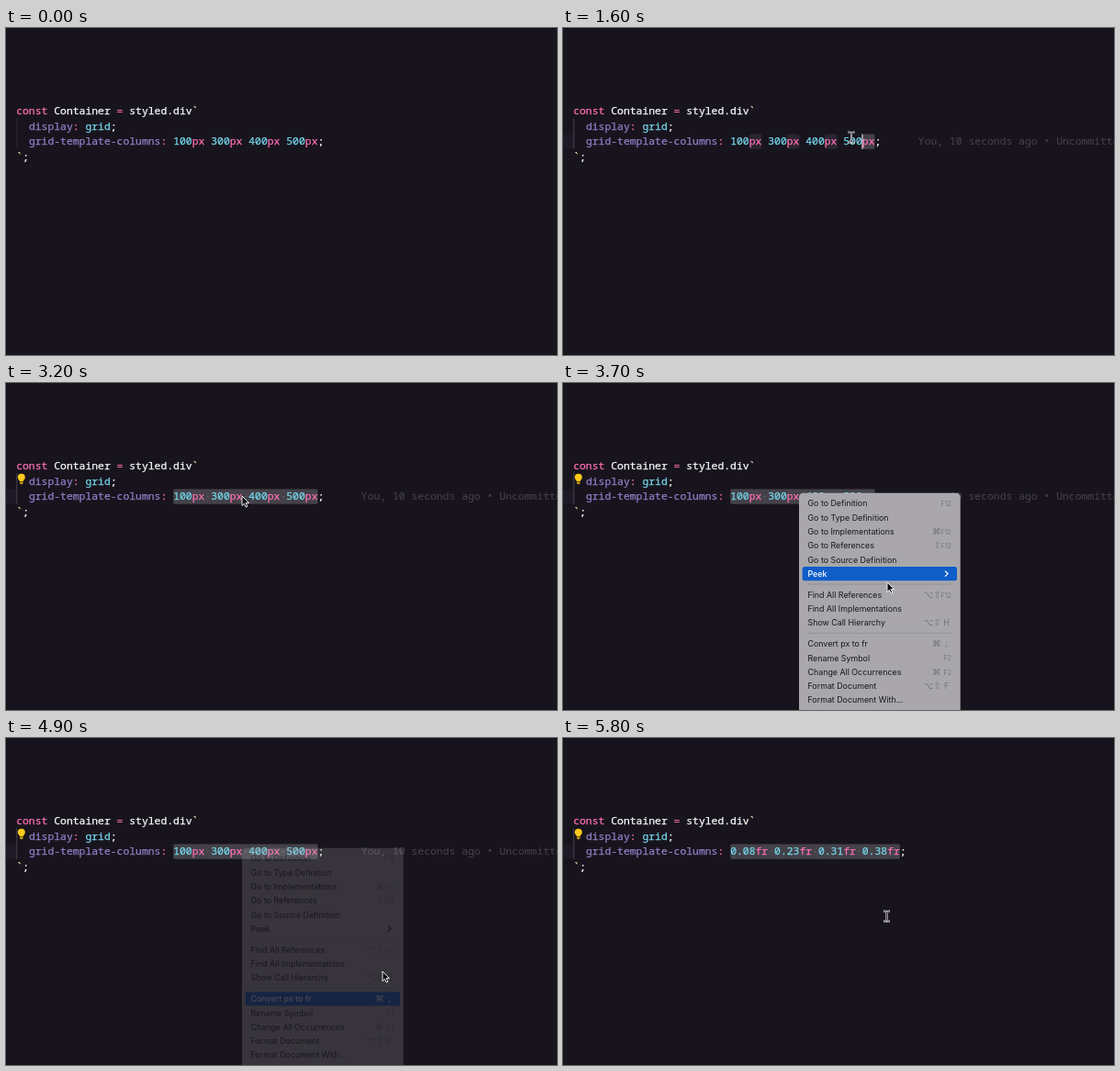
Write an HTML page that moves like this. It is 600 px wide and 356 px high and loops after 5.9 s.

```html
<!DOCTYPE html>
<html lang="en">
<head>
<meta charset="utf-8">
<title>Convert px to fr</title>
<style>
  html, body { margin: 0; width: 100%; height: 100%; overflow: hidden; background: #18141d; }
  svg { display: block; width: 600px; height: 356px; }
  text { white-space: pre; }
  .code { font: 11.4px "Noto Sans Mono", "DejaVu Sans Mono", monospace; color: #fbfafc; }
  .code, .code tspan { fill: currentColor; stroke: currentColor; stroke-width: .25; }
  .code .pink { color: #ff70b5; }
  .code .cyan { color: #75d7ec; }
  .code .purple { color: #8f80c8; }
  .code .yellow { color: #ece5b0; }
  .blame { color: #45414a; stroke-width: .1; }
  .menu { font: 8.85px Inter, Roboto, sans-serif; }
  .item { fill: #18171b; }
  .keys { fill: #75737a; }
  .symbol { font: 9.5px "DejaVu Sans", sans-serif; }
  .fn { font-size: 7px; }
  .hover .item, .hover .keys { fill: #fff; }
  .hover .item { font-weight: 500; }
  .hover .bar { visibility: visible; }
  .bar { fill: #0f5dc9; visibility: hidden; }
  .chevron { fill: none; stroke: #242328; stroke-width: 1.3; }
  .hover .chevron { stroke: #fff; }
</style>
</head>
<body>
<svg viewBox="0 0 600 356">
  <rect width="600" height="356" fill="#18141d"/>
  <rect id="lineBand" y="116" width="11" height="15.5" fill="#1d1926"/>
  <path id="guide" d="M11.8 98.5V131.5"/>
  <g id="marks"></g>
  <g id="editor" class="code"></g>
  <text id="blame" class="code blame" y="127.2">You, 10 seconds ago • Uncommitted changes</text>
  <rect id="caret" y="115.5" width="1" height="16.3" fill="#f4f2f7"/>
  <g id="bulb">
    <path d="M14.8 107C14.8 105.8 12.8 105 12.8 102.8A4 4 0 0 1 20.8 102.8C20.8 105 18.8 105.8 18.8 107Z" fill="#ffca1a"/>
    <path d="M15 107.5H18.6V109L17.8 110.2H15.8L15 109Z" fill="#c89b12"/>
  </g>
  <g id="menu" class="menu">
    <rect x="257" y="119.7" width="175.7" height="250" rx="4.5" fill="#a9a7ac"/>
    <path d="M266.5 219H423.5M266.5 272.3H423.5" stroke="#918f95"/>
  </g>
  <path id="arrow" d="M0 0V10.6L2.4 8.3L4.1 12.1L5.9 11.3L4.2 7.6H7.5Z" fill="#0b0a0c" stroke="#fff" stroke-width=".9" stroke-linejoin="round"/>
  <g id="beam" fill="none" stroke-linecap="square">
    <path d="M-2.5 -5.5Q0 -5.5 0 -4V4Q0 5.5 -2.5 5.5M2.5 -5.5Q0 -5.5 0 -4M2.5 5.5Q0 5.5 0 4" stroke="#e9e8eb" stroke-width="2.1"/>
    <path d="M-2.5 -5.5Q0 -5.5 0 -4V4Q0 5.5 -2.5 5.5M2.5 -5.5Q0 -5.5 0 -4M2.5 5.5Q0 5.5 0 4" stroke="#29262d" stroke-width=".8"/>
  </g>
</svg>
<script>
const LOOP = 5900, STEP = 100;
const LEFT = 11.2, CHAR = 6.84, VALUE_COL = 25;
const PX = "100px 300px 400px 500px";
const FR = "0.08fr 0.23fr 0.31fr 0.38fr";
const $ = id => document.getElementById(id);
const colX = col => LEFT + col * CHAR;
const show = (id, on) => $(id).setAttribute("visibility", on ? "visible" : "hidden");
const span = (color, text) => `<tspan class="${color}">${text}</tspan>`;
const codeLine = (row, body, col = 0) =>
  `<text x="${colX(col)}" y="${94 + row * 16.6}">${body}</text>`;

// Menu rows: label, modifier symbols, key, centre y
const ROWS = [
  ["Go to Definition", "", "F12", 131],
  ["Go to Type Definition", "", "", 146.3],
  ["Go to Implementations", "⌘", "F12", 161.6],
  ["Go to References", "⇧", "F12", 177],
  ["Go to Source Definition", "", "", 192.3],
  ["Peek", "", ">", 207.6],
  ["Find All References", "⌥⇧", "F12", 230.5],
  ["Find All Implementations", "", "", 245.8],
  ["Show Call Hierarchy", "⌥⇧", "H", 261.1],
  ["Convert px to fr", "⌘", ";", 284],
  ["Rename Symbol", "", "F2", 299.3],
  ["Change All Occurrences", "⌘", "F2", 314.6],
  ["Format Document", "⌥⇧", "F", 329.9],
  ["Format Document With...", "", "", 345.2]
];

function keyMarkup(key, y) {
  if (key === ">") return `<path class="chevron" d="M416 ${y - 3}L419 ${y}L416 ${y + 3}"/>`;
  return key.length > 1
    ? `<text class="keys fn" x="423" y="${y + 3}" text-anchor="end">${key}</text>`
    : `<text class="keys" x="417.5" y="${y + 3.2}" text-anchor="middle">${key}</text>`;
}

$("menu").innerHTML += ROWS.map(([label, symbols, key, y]) => `<g class="row">
  <rect class="bar" x="260.7" y="${y - 7.6}" width="168.3" height="15.2" rx="2.5"/>
  <text class="item" x="266.5" y="${y + 3.2}">${label}</text>
  <text class="keys symbol" x="411.5" y="${y + 3.3}" text-anchor="end">${symbols}</text>
  ${keyMarkup(key, y)}</g>`).join("");
const rowNodes = [...document.querySelectorAll(".row")];

$("editor").innerHTML =
  codeLine(0, span("pink", "const") + " Container " + span("pink", "=") + " styled.div" + span("yellow", "`")) +
  codeLine(1, span("purple", "display") + span("pink", ":") + " " + span("cyan", "grid") + ";", 2) +
  codeLine(2, span("purple", "grid-template-columns") + span("pink", ":"), 2) +
  codeLine(2, "", VALUE_COL).replace("<text", '<text id="value"') +
  codeLine(3, span("yellow", "`") + ";");
$("blame").setAttribute("x", colX(55) - .6);

// Keyed paths: time followed by values
const POINTER = [
  [100, 334, 296], [600, 338, 122], [1100, 380, 19], [1400, 340, 122],
  [1600, 314, 119], [2300, 181, 122], [2600, 183, 122], [3100, 257, 123],
  [3400, 257, 123], [3700, 353, 217], [4200, 374, 294], [4500, 371, 281],
  [4700, 371, 281], [4900, 410, 254], [5100, 396, 226], [5400, 352.5, 194]
];
const DRAG = [[1400, 48], [1600, 46], [2300, 25]];
const FADE = [[4700, 1], [4800, .7], [4900, .22], [5000, 0]];

function along(keys, t) {
  const next = keys.findIndex(k => k[0] > t);
  if (next < 0) return keys[keys.length - 1].slice(1);
  if (next === 0) return keys[0].slice(1);
  const a = keys[next - 1], b = keys[next];
  const p = (t - a[0]) / (b[0] - a[0]);
  return a.slice(1).map((v, i) => v + (b[i + 1] - v) * p);
}

function mark(start, length, color) {
  return `<rect x="${colX(VALUE_COL + start)}" y="115.6" width="${length * CHAR}" height="16.2" rx="1.5" fill="${color}"/>`;
}

function selectionMarkup(text, from) {
  const picked = text.slice(from);
  let out = "";
  if (!picked) return out;
  for (let i = text.indexOf(picked); i >= 0 && i < from; i = text.indexOf(picked, i + 1))
    out += mark(i, picked.length, "#2a262f");
  out += mark(from, picked.length, "#444149");
  for (let i = from; i < text.length; i++)
    if (text[i] === " ")
      out += `<circle cx="${colX(VALUE_COL + i + .5)}" cy="123.6" r=".7" fill="#77747d"/>`;
  return out;
}

function render(t) {
  const converted = t >= 5100, clicked = t >= 1400;
  const text = converted ? FR : PX;
  $("value").innerHTML = text.replace(/[\d.]+|px|fr/g,
    part => span(/\d/.test(part) ? "cyan" : "pink", part)) + ";";

  const col = Math.round(along(DRAG, t)[0]);
  $("marks").innerHTML = clicked ? selectionMarkup(text, col - VALUE_COL) : "";
  $("caret").setAttribute("x", colX(col) - .4);
  show("caret", clicked && t < 2400);
  show("lineBand", clicked);
  $("guide").setAttribute("stroke", clicked ? "#48444e" : "#2b2731");
  show("blame", t >= 1500 && !converted);
  show("bulb", t >= 2500);

  const [x, y] = along(POINTER, t);
  const isArrow = t >= 2700 && t < 5000;
  for (const id of ["arrow", "beam"]) $(id).setAttribute("transform", `translate(${x} ${y})`);
  show("arrow", isArrow);
  show("beam", t >= 100 && !isArrow);

  const open = t >= 3400 && t < 5000;
  $("menu").style.display = open ? "" : "none";
  $("menu").setAttribute("opacity", along(FADE, t)[0]);
  const hoverY = along(POINTER, Math.min(t, 4700))[1];
  const hovered = ROWS.filter(row => row[3] - 7.7 <= hoverY).length - 1;
  rowNodes.forEach((node, i) => node.classList.toggle("hover", open && i === hovered));
}

const begin = performance.now();
let shown = -1;
function tick() {
  const t = Math.floor(((performance.now() - begin) % LOOP) / STEP) * STEP;
  if (t !== shown) render(shown = t);
  requestAnimationFrame(tick);
}
tick();
</script>
</body>
</html>
```
